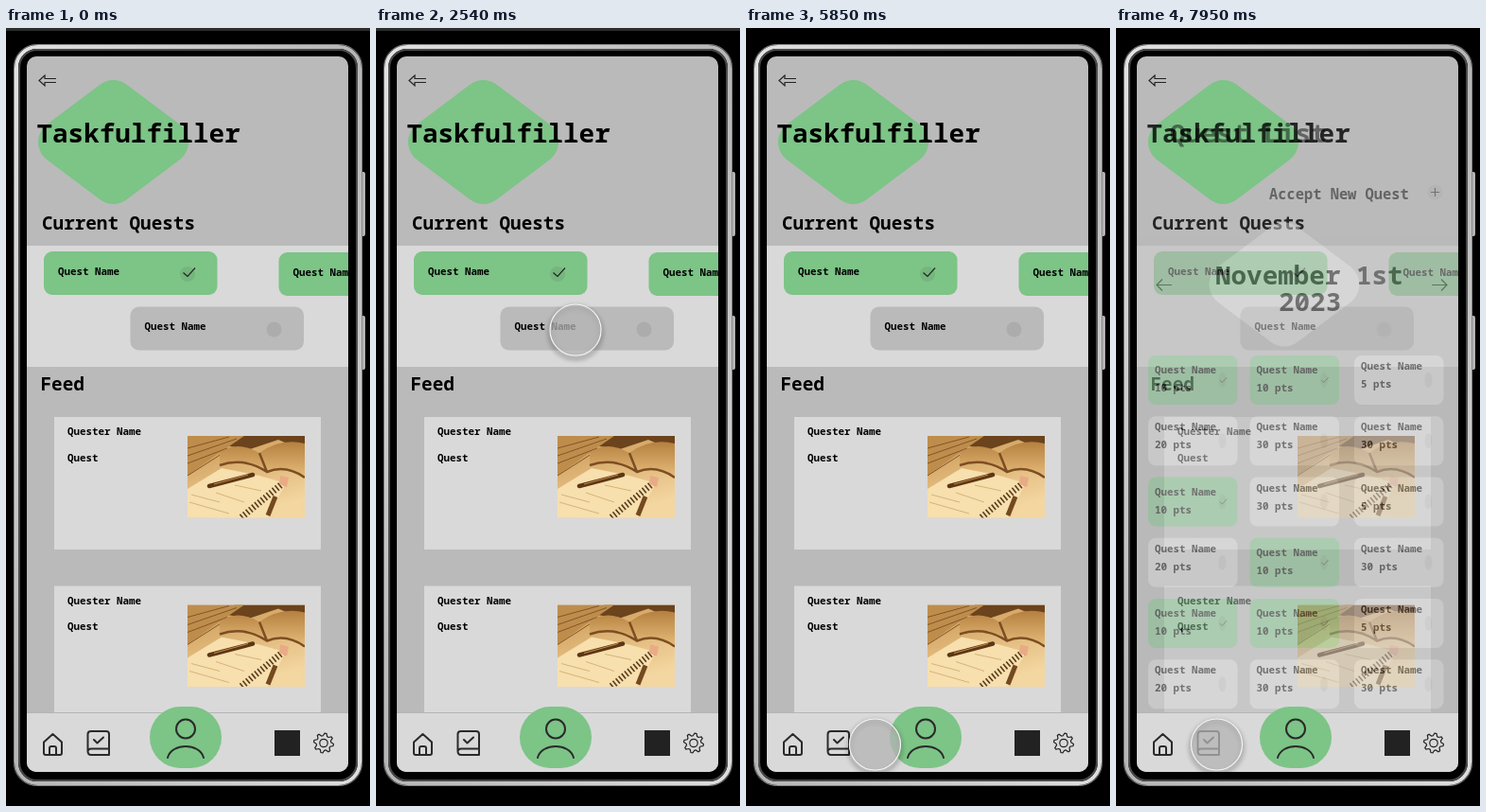
An HTML page for the animation above (8000 ms loop, 385 by 822 pixels).

```html
<!DOCTYPE html>
<html lang="en">
<head>
<meta charset="utf-8">
<title>Quest app</title>
<style>
html, body { margin: 0; width: 100%; height: 100%; overflow: hidden; background: #000; }
svg { display: block; width: 385px; height: 822px; }
text { font: 600 10.85px "Noto Sans Mono", "DejaVu Sans Mono", monospace; white-space: pre; }
.title { font-size: 27.6px; }
.head { font-size: 19.3px; }
.mid { font-size: 15.4px; }
.line { fill: none; stroke: #2a2a2a; stroke-width: 2; stroke-linecap: round; stroke-linejoin: round; }
.thin { fill: none; stroke: #222; stroke-width: 1.2; }
.green { fill: #7dc487; }
.gray { fill: #bababa; }
.light { fill: #d9d9d9; }
</style>
</head>
<body>
<svg viewBox="0 0 385 822">
  <defs>
    <clipPath id="screen"><rect x="22" y="30" width="340" height="756" rx="10"/></clipPath>
    <clipPath id="photoBox"><rect width="124" height="86.5"/></clipPath>
    <linearGradient id="metal" x2="1" y2="1">
      <stop offset="0" stop-color="#e2e2e2"/><stop offset=".5" stop-color="#b5b5b5"/><stop offset="1" stop-color="#dedede"/>
    </linearGradient>
    <linearGradient id="paper" x2=".4" y2="1">
      <stop offset="0" stop-color="#c9954f"/><stop offset="1" stop-color="#f3d6a0"/>
    </linearGradient>
    <linearGradient id="page" x2="0" y2="1">
      <stop offset="0" stop-color="#b5803f"/><stop offset="1" stop-color="#e6bd7c"/>
    </linearGradient>
    <filter id="soft" x="-30%" y="-30%" width="160%" height="160%"><feGaussianBlur stdDeviation="2.5"/></filter>
    <path id="diamond" d="M-56 0 0-42 56 0 0 42Z" stroke-width="47" stroke-linejoin="round"/>
    <g id="photo" clip-path="url(#photoBox)">
      <path fill="url(#paper)" d="M0 0h124v87H0z"/>
      <path fill="#6b431c" d="M50 0h74v16L96 4 66 14 38 10z"/>
      <path fill="#be8d4c" d="M0 0h60L28 22 0 42z"/>
      <path fill="none" stroke="#80552a" d="M0 13 44 1M0 21 52 3M0 29 42 13M0 42 36 19"/>
      <path fill="url(#page)" d="M34 18Q52 4 76 18Q98 2 124 8V44Q100 30 84 38Q62 22 34 32z"/>
      <path fill="none" stroke="#7d4e22" stroke-width="2.500" d="M34 31Q60 22 84 38Q104 30 124 44M76 18 84 38"/>
      <path fill="#f7dfae" d="M0 56 36 34 76 42 104 50 84 87H0z"/>
      <path fill="none" stroke="#c89f62" stroke-width=".7" d="M4 62 34 70M2 70 44 82M30 60 60 70M50 52 78 58"/>
      <path fill="none" stroke="#5c3715" stroke-width="4.500" stroke-linecap="round" d="M23 53 69 41"/>
      <path fill="none" stroke="#c48a48" d="M28 51 64 41"/>
      <path fill="none" stroke="#5a3c1c" stroke-width="7" stroke-dasharray="1.6 2.4" d="M57 86 102 49"/>
      <path fill="none" stroke="#74491f" stroke-width="5" d="M85 84 93 64"/>
      <path fill="#e9ab85" d="M98 42l9 2-2 10-8-3z"/>
    </g>
  </defs>

  <rect width="385" height="822"/>
  <rect id="topBar" width="385" height="3" fill="#2b2d2d"/>

  <rect x="375" y="152" width="5" height="68" rx="2" fill="#b4b4b4"/>
  <rect x="375" y="304" width="5" height="57" rx="2" fill="#b4b4b4"/>
  <rect x="8.500" y="17.500" width="368" height="783" rx="24" fill="#000" stroke="#888"/>
  <rect x="11" y="20" width="363" height="778" rx="22" fill="none" stroke="url(#metal)" stroke-width="4"/>
  <rect x="14" y="23" width="357" height="772" rx="19" fill="none" stroke="#4a4a4a" stroke-width="2"/>

  <g clip-path="url(#screen)">
    <rect class="gray" x="22" y="30" width="340" height="756"/>
    <use href="#diamond" x="113.500" y="120.500" fill="#7dc487" stroke="#7dc487"/>
    <path class="thin" d="M53 53.500H41V50L35 55.500l6 5.500V57.500H53"/>
    <g id="home"></g>
    <g id="list" opacity="0"></g>
    <rect class="light" x="22" y="723" width="340" height="63"/>
    <path d="M22 723.500H362" stroke="#b5b5b5"/>
    <rect class="green" x="152" y="717" width="76" height="65" rx="32.500"/>
    <g class="line">
      <circle cx="190" cy="740.500" r="10"/>
      <path d="M171 771C175 755 205 755 209 771"/>
      <path d="M40 754.500 49.500 746 59 754.500V766q0 2-2 2H42q-2 0-2-2zM46 768v-7q0-2 2-2h3q2 0 2 2v7"/>
      <path d="M90 743H106q3 0 3 3V768H90q-3.500 0-3.500-4V746q0-3 3.500-3zM86.500 765q0-3.500 3.500-3.500H109M93 752l3.500 3.500 6.500-6"/>
    </g>
    <rect x="284" y="742" width="27" height="27" fill="#222"/>
    <path id="gear" class="thin"/>
    <circle class="thin" cx="336" cy="755.500" r="4.200"/>
  </g>

  <g id="hint">
    <rect x="343.500" y="809.500" width="60" height="30" fill="#c2c2c2" stroke="#8c8c8c"/>
    <circle class="thin" cx="355" cy="825" r="4"/>
  </g>

  <g id="cursor">
    <circle cy="3" r="27" fill="none" stroke="#000" stroke-width="4" opacity=".28" filter="url(#soft)"/>
    <circle r="27" fill="#b4b4b4" fill-opacity=".75" stroke="#f4f4f4" stroke-width="1.200"/>
  </g>
</svg>
<script>
const $ = id => document.getElementById(id);
const text = (x, y, s, cls = "") => `<text x="${x}" y="${y}" class="${cls}">${s}</text>`;
const box = (x, y, w, h, cls, r = 0) =>
  `<rect x="${x}" y="${y}" width="${w}" height="${h}" rx="${r}" class="${cls}"/>`;
const tick = (x, y, size = 1) =>
  `<path class="thin" transform="translate(${x} ${y}) scale(${size})" d="M-5.500-1.500l4.500 4 8-9"/>`;
const dot = (x, y, rx = 8) => `<ellipse cx="${x}" cy="${y}" rx="${rx}" ry="8" opacity=".07"/>`;

const quest = (x, y, cls) =>
  box(x, y, 183.5, 46, cls, 9) + text(x + 15, y + 24.5, "Quest Name") + dot(x + 152, y + 24);
const post = y => box(51, y, 282, 140, "light") + text(65, y + 19, "Quester Name") +
  text(65, y + 46.5, "Quest") + `<use href="#photo" x="192" y="${y + 20}"/>`;

$("home").innerHTML =
  text(32.5, 121, "Taskfulfiller", "title") + text(38, 213, "Current Quests", "head") +
  box(22, 230, 340, 128, "light") +
  quest(40, 236, "green") + tick(193, 260) + quest(288.5, 237, "green") + quest(131.5, 294.5, "gray") +
  text(36.5, 383, "Feed", "head") + post(411) + post(589.5);

const points = [[10, 10, 5], [20, 30, 30], [10, 30, 5], [20, 10, 30], [10, 10, 5], [20, 30, 30]];
const card = (x, y, pts) => {
  const done = pts === 10, base = y + (done ? 19 : 15);
  return box(x, y, 94.5, 52, done ? "green" : "light", 8) +
    text(x + 7, base, "Quest Name") + text(x + 7, base + 19, pts + " pts") +
    dot(x + 78.5, y + 26, 4) + (done ? tick(x + 79, y + 27, .6) : "");
};
$("list").innerHTML =
  box(22, 222, 340, 501, "gray") +
  text(57, 121, "Quest List", "title") + text(162, 181, "Accept New Quest", "mid") +
  dot(337.5, 173.5) + `<path class="thin" d="M333 173.500h9M337.500 169v9"/>` +
  `<use href="#diamond" x="178" y="271" fill="#d9d9d9" stroke="#d9d9d9"/>` +
  text(105, 271, "November 1st", "title") + text(172, 299, "2023", "title") +
  `<path class="thin" d="M59 271.500H43m6-6-6 6 6 6M334 271.500h16m-6-6 6 6-6 6"/>` +
  points.map((row, j) => row.map((p, i) => card([34, 141.5, 252][i], 346 + j * 64.25, p)).join("")).join("");

let gear = "";
for (let i = 0; i < 32; i++) {
  const a = (i + .5) * Math.PI / 16, r = i % 4 < 2 ? 10.5 : 7.8;
  gear += (i ? "L" : "M") + (336 + r * Math.sin(a)).toFixed(2) + " " + (755.5 - r * Math.cos(a)).toFixed(2);
}
$("gear").setAttribute("d", gear + "Z");

// Pointer moves: start ms, end ms, steps, then points as [progress, x, y]
const moves = [
  [1410, 1740, 6, [[0, 405, 240], [.4, 320, 130], [.8, 215, 94], [1, 175, 106]]],
  [2060, 2810, 12, [[0, 160, 112], [.3, 107, 165], [.636, 211, 319], [1, 240, 325]]],
  [2870, 3010, 3, [[0, 242, 350], [1, 237, 428]]],
  [3670, 4430, 12, [[0, 194, 518], [.5, 110, 670], [1, 62, 758]]],
  [4500, 4570, 2, [[0, 60, 757], [1, 58, 755]]],
  [4850, 5650, 12, [[0, 60, 753], [1, 117, 757]]],
  [5710, 6470, 12, [[0, 121, 757], [1, 206, 757]]],
  [6930, 7410, 8, [[0, 183, 757], [1, 106.5, 757]]]
];

function pointer(t) {
  const move = moves.filter(m => t >= m[0]).pop();
  if (!move) return null;
  const [start, end, steps, path] = move;
  const u = Math.min(1, Math.floor((t - start) / (end - start) * (steps - 1) + .05) / (steps - 1));
  const i = Math.max(1, path.findIndex(p => p[0] >= u));
  const [u0, x0, y0] = path[i - 1], [u1, x1, y1] = path[i];
  const k = (u - u0) / (u1 - u0);
  return [x0 + (x1 - x0) * k, y0 + (y1 - y0) * k];
}

const clamp = v => Math.max(0, Math.min(1, v));
const show = (id, v) => $(id).setAttribute("opacity", v);

function draw(now) {
  const t = now % 8000, p = pointer(t);
  const fade = clamp((t - 7570) / 380) ** 1.2;
  show("cursor", p ? 1 : 0);
  if (p) $("cursor").setAttribute("transform", `translate(${p})`);
  show("hint", t >= 1290 && t < 1740 ? 1 : 0);
  show("topBar", t < 3670 ? 1 : clamp(.65 - (t - 3670) / 320));
  show("home", 1 - .2 * fade);
  show("list", .46 * fade);
  requestAnimationFrame(draw);
}
draw(0);
</script>
</body>
</html>
```
